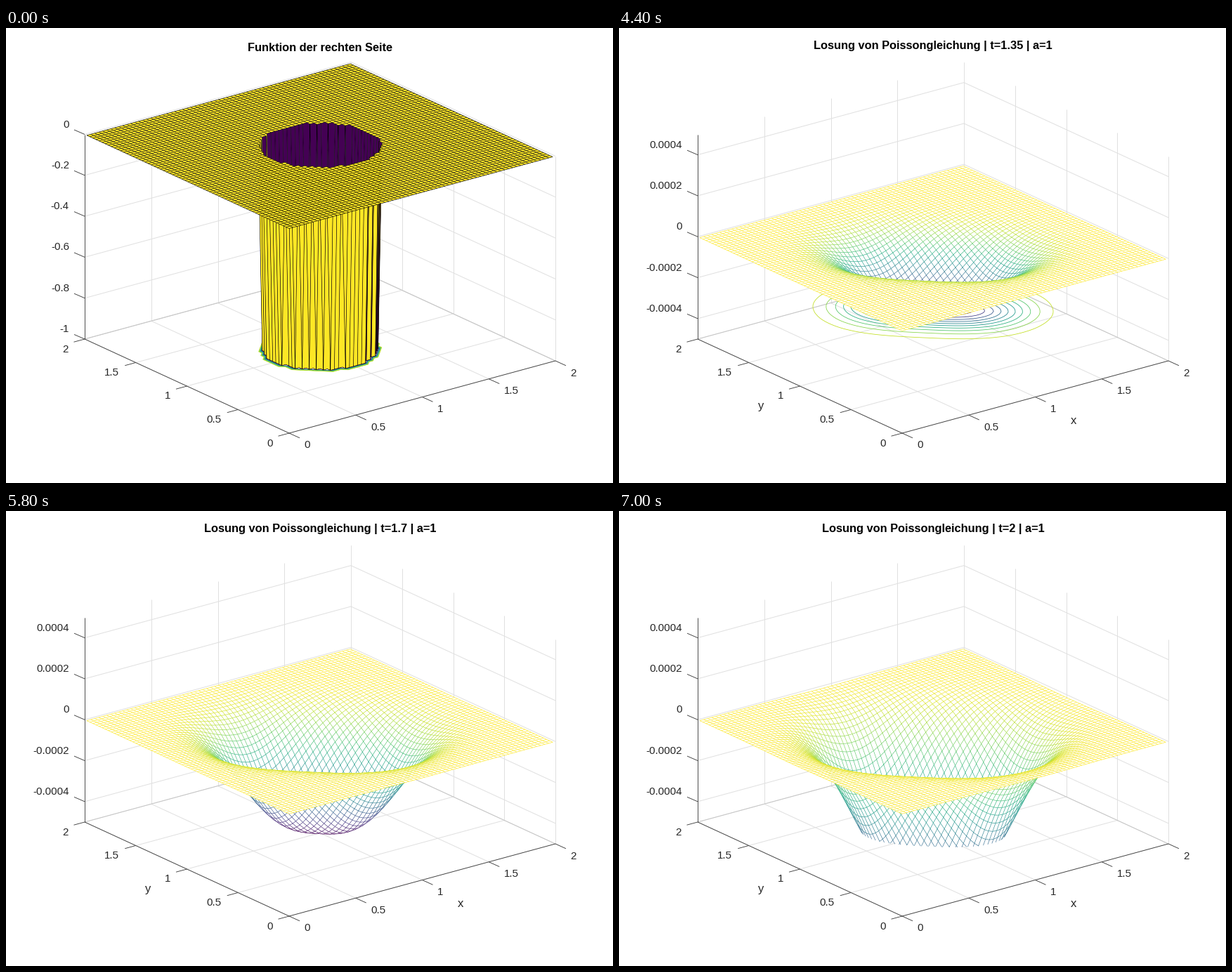
Recreate the animation shown at these times as a matplotlib script. Size 864 by 648 pixels, loop 7.2 s.

```python
import numpy as np
import matplotlib.pyplot as plt
from matplotlib.animation import FuncAnimation
from matplotlib.collections import LineCollection, PathCollection
from matplotlib.path import Path

W, H, DPI = 864, 648, 100
PT = 72 / DPI
FRAME_MS, HOLD, STEPS = 200, 15, 21
DARK, GRID = "#262626", "#e0e0e0"
CMAP = plt.get_cmap("viridis")
Z_LIM = 5e-4
MESH_WIDTH = 0.6

fig = plt.figure(figsize=(W / DPI, H / DPI), dpi=DPI, facecolor="white")
ax = fig.add_axes([0, 0, 1, 1])
ax.set_xlim(0, W)
ax.set_ylim(H, 0)
ax.axis("off")
plt.rcParams["font.family"] = "Liberation Sans"

axis = np.arange(0, 2, 0.03)
X, Y = np.meshgrid(axis, axis, indexing="ij")
N = len(axis)


def project(x, y, z):
    """Orthographic view; z is the fraction of the vertical axis."""
    x, y, z = np.broadcast_arrays(x, y, z)
    return np.stack([403 + 189.5 * x - 145.5 * y,
                     577 - 51.5 * x - 67 * y - 291.5 * z], -1)


def segment(a, b):
    return project(*np.array([a, b], float).T)


def label(x, y, text, size=15.1, **kw):
    return ax.text(x, y, text, fontsize=size * PT, color=kw.pop("color", DARK),
                   va="baseline", **kw)


def heading(y, text):
    return label(447.3, y, text, 16.4, ha="center", weight="bold", color="black")


def add_lines(segments, color, width, z):
    lines = LineCollection(segments, colors=color, linewidths=width * PT, zorder=z)
    return ax.add_collection(lines, autolim=False)


def draw_box():
    ticks = np.arange(0, 2.1, 0.5)
    grid, marks = [], []
    for t in ticks:
        grid += [segment((t, 0, 0), (t, 2, 0)), segment((0, t, 0), (2, t, 0)),
                 segment((t, 2, 0), (t, 2, 1)), segment((2, t, 0), (2, t, 1))]
        px, py = project(t, 0, 0)
        marks.append([(px, py), (px + 15, py + 6.8)])
        label(px + 21.5, py + 21.5, f"{t:g}")
        px, py = project(0, t, 0)
        marks.append([(px, py), (px - 15.5, py + 4.2)])
        label(px - 23.5, py + 18.5, f"{t:g}", ha="right")
    add_lines(grid, GRID, 1, 1)
    add_lines([segment((0, 2, 0), (2, 2, 0)), segment((2, 2, 0), (2, 0, 0))],
              "#c4c4c4", 0.9, 1.1)
    add_lines(marks + [segment((0, 0, 0), (2, 0, 0)), segment((0, 0, 0), (0, 2, 0)),
                       segment((0, 2, 0), (0, 2, 1))], "#404040", 0.9, 1.2)


def draw_z_ticks(values, low, high):
    grid, marks, made = [], [], []
    for v in values:
        f = (v - low) / (high - low)
        px, py = project(0, 2, f)
        grid += [segment((0, 2, f), (2, 2, f)), segment((2, 2, f), (2, 0, f))]
        marks.append([(px, py), (px - 15, py - 6.5)])
        made.append(label(90, py - 10, f"{v:g}", ha="right"))
    return made + [add_lines(grid, GRID, 1, 1), add_lines(marks, "#404040", 0.9, 1.2)]


def clip_segments(a, b):
    """Cut 3D segments at the floor of the box."""
    za, zb = a[..., 2:], b[..., 2:]
    gap = np.where(np.abs(zb - za) < 1e-12, 1, zb - za)
    cut = a + (b - a) * (-za / gap)
    start = np.where((za < 0) & (zb >= 0), cut, a)
    end = np.where((zb < 0) & (za >= 0), cut, b)
    end = np.where((za < 0) & (zb < 0), start, end)
    return project(*np.moveaxis(start, -1, 0)), project(*np.moveaxis(end, -1, 0))


def draw_surface(z, low, high, filled):
    """Paint cells from back to front, each with its two far edges."""
    pts = np.stack([X, Y, (z - low) / (high - low)], -1)
    shade = CMAP((z - z.min()) / (z.max() - z.min()))
    i, j = np.indices((N - 1, N - 1)).reshape(2, -1)
    order = np.argsort(-(i + j), kind="stable")
    i, j = i[order], j[order]
    corners = np.stack([pts[i, j], pts[i + 1, j], pts[i + 1, j + 1], pts[i, j + 1]], 1)
    keep = corners[..., 2].max(1) >= 0
    i, j, corners = i[keep], j[keep], corners[keep]

    flat = corners.copy()
    flat[..., 2] = np.maximum(flat[..., 2], 0)
    faces = project(*np.moveaxis(flat, -1, 0))
    a1, b1 = clip_segments(corners[:, 3], corners[:, 2])
    a2, b2 = clip_segments(corners[:, 1], corners[:, 2])
    edges = np.stack([a1, b1, a2, b2], 1)

    codes = [Path.MOVETO, Path.LINETO] * 2
    paths = []
    for face, edge in zip(faces, edges):
        paths += [Path(face), Path(edge, codes)]
    fills = np.zeros((len(paths), 4))
    strokes = np.zeros((len(paths), 4))
    fills[::2] = shade[i, j] if filled else 1
    strokes[1::2] = (0, 0, 0, 1) if filled else shade[i + 1, j + 1]
    cells = PathCollection(paths, facecolors=fills, edgecolors=strokes,
                           linewidths=[0, MESH_WIDTH * PT], zorder=3)
    ax.add_collection(cells, autolim=False)

    front = [project(*pts[0].T), project(*pts[:, 0].T)]
    rim = "black" if filled else shade[0, 0]
    return [cells, add_lines(front, [rim], MESH_WIDTH, 4)]


def draw_contours(z, height):
    p = project(X, Y, height)
    levels = np.linspace(z.min(), z.max(), 12)[1:-1]
    return ax.contour(p[..., 0], p[..., 1], z, levels=levels, cmap=CMAP,
                      vmin=z.min(), vmax=z.max(), linewidths=0.8 * PT, zorder=2)


def contour_plane(depth):
    """Lower limit an automatic axis would pick for this depth."""
    raw = depth / 5
    base = 10 ** np.floor(np.log10(raw))
    lead = raw / base
    step = base * (1 if lead < 1.5 else 2 if lead < 3.5 else 5 if lead < 7.5 else 10)
    return -np.ceil(depth / step) * step


def solution(t):
    s = t - 1
    u = np.abs(X - Y) / np.sqrt(2) / (0.515 + 0.055 * s)
    v = np.abs(X + Y - 2) / np.sqrt(2) / (0.25 + 0.18 * s - 0.07 * s * s)
    return -1.21e-4 * t ** 2.68 * np.exp(-u ** 2.95 - v ** (1.9 - 0.08 * s))


def draw_source():
    z = np.where((X - 1) ** 2 + (Y - 1) ** 2 <= 0.35 ** 2, -1.0, 0.0)
    return [heading(33, "Funktion der rechten Seite"),
            draw_contours(z, 0), *draw_surface(z, -1, 0, True),
            *draw_z_ticks([k / 5 for k in range(-5, 1)], -1, 0)]


def draw_solution(t):
    z = solution(t)
    made = [heading(30, f"Losung von Poissongleichung | t={t:g} | a=1"),
            label(202, 543.5, "y", 16.6, ha="center"),
            label(647, 563.5, "x", 16.6, ha="center")]
    plane = contour_plane(-z.min())
    if plane >= -Z_LIM - 1e-9:
        made.append(draw_contours(z, (plane + Z_LIM) / (2 * Z_LIM)))
    made += draw_surface(z, -Z_LIM, Z_LIM, False)
    return made + draw_z_ticks([k * 2e-4 for k in range(-2, 3)], -Z_LIM, Z_LIM)


draw_box()
scene = {"step": None, "artists": []}


def update(frame):
    step = max(0, frame - HOLD + 1)
    if step != scene["step"]:
        for artist in scene["artists"]:
            artist.remove()
        scene["artists"] = draw_solution(1 + 0.05 * (step - 1)) if step else draw_source()
        scene["step"] = step
        ax.set_xlim(0, W)
        ax.set_ylim(H, 0)
    return []


anim = FuncAnimation(fig, update, frames=HOLD + STEPS, interval=FRAME_MS,
                     init_func=lambda: update(0), repeat=True, repeat_delay=0)
plt.show()
```
